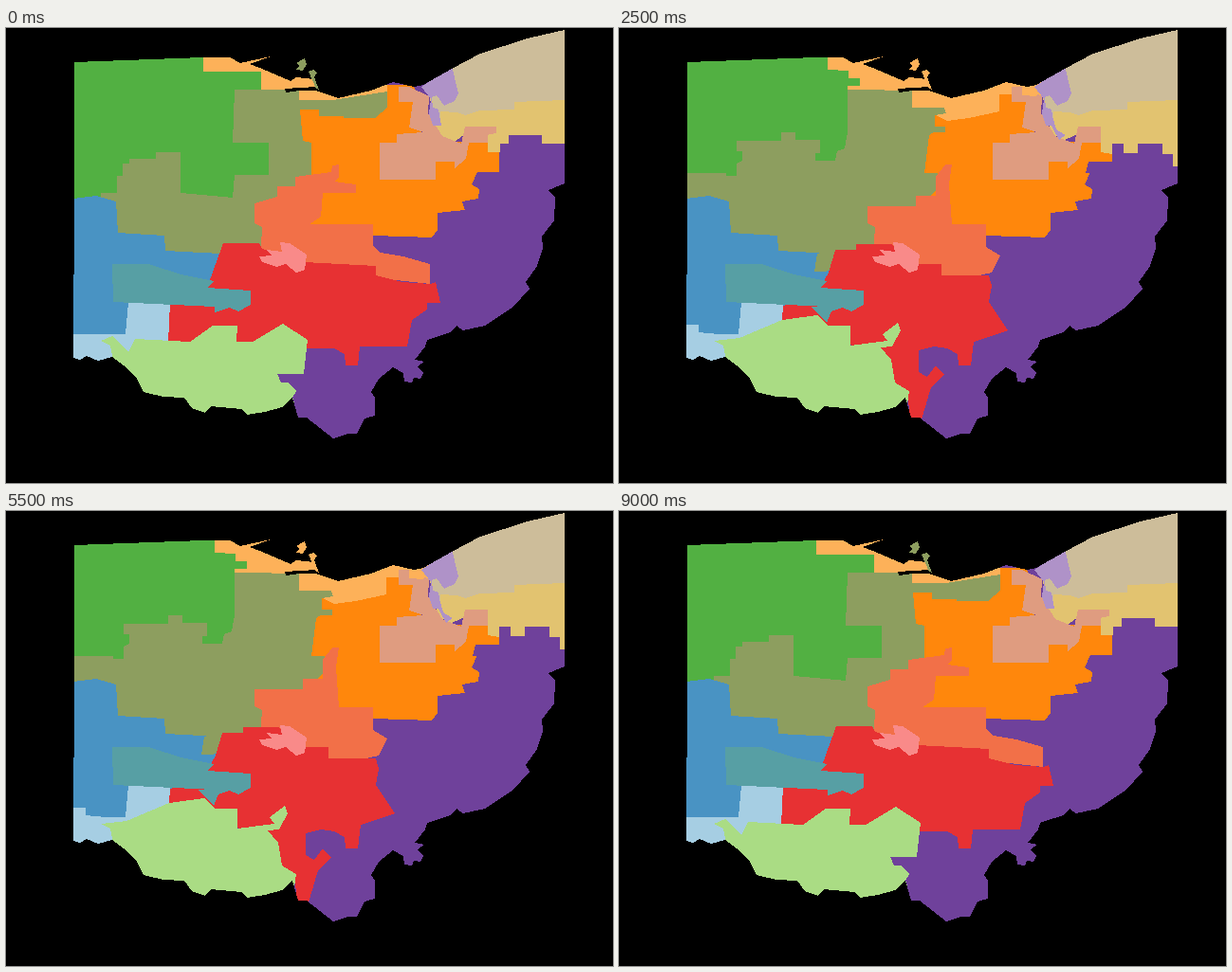
An HTML page for the animation above (10000 ms loop, 640 px wide and 480 px high).

```html
<!DOCTYPE html>
<html lang="en">
<head>
<meta charset="utf-8">
<title>District map</title>
<style>
  html, body { margin: 0; height: 100%; overflow: hidden; background: #000; }
  svg { display: block; width: 100%; height: 100%; }
  svg.later .before, svg:not(.later) .after { display: none; }
  .lightblue { fill: #a6cee3 } .blue { fill: #4993c3 }
  .teal { fill: #579fa4 } .lime { fill: #aadc84 }
  .green { fill: #52b042 } .olive { fill: #8d9e5f }
  .pink { fill: #f98a89 } .red { fill: #e73133 }
  .coral { fill: #f27048 } .peach, .later .isles { fill: #fdb159 }
  .orange { fill: #ff870c } .salmon { fill: #df9c80 }
  .lilac { fill: #af92c8 } .purple { fill: #6f419b }
  .tan { fill: #cdbd9a } .yellow { fill: #e2c370 }
</style>
</head>
<body>
<!-- each layer covers the rough edges of those beneath it -->
<svg viewBox="0 0 640 480" shape-rendering="crispEdges">
  <path class="purple" d="M71,0H589V435H71z"/>
  <path class="orange" d="M310,60H430L440,120H520V152H497L491,165 499,170 498,180 481,183 484,192 455,195V213L449,221 387,219 310,205z"/>
  <path class="after purple" d="M521,141H495L492,153H521z"/>
  <path class="before yellow" d="M446,70H589V122H565V113H530V122H521V131H508V112H484L470,122 456,118z"/>
  <path class="after yellow" d="M446,70H589V146H584V133H573V122H547V132H532V122H520V133L508,131V112H484L470,118 456,112z"/>

  <path class="before peach" d="M208,25H402V80H208z"/>
  <path class="after peach" d="M220,25H448V72L414,70H401V88L369,95 346,98 330,90H220z"/>
  <path class="before olive" d="M72,60H250V65H309V76H345L402,67V84L389,95H356V93H330V86H310L313,119 322,121V156L265,240H72z"/>
  <path class="after olive" d="M72,62L309,66V84H343L345,90 333,92V104H344V110H332L327,113 322,153H336V170L265,240H72z"/>
  <path class="before green" d="M72,30H208V46H269V65H241L239,121H277V155H241L239,179 184,174V131H158V138H130V143H123V156H117V174H100V181H72z"/>
  <path class="after green" d="M72,30H220V44L242,45V53H254V61H241V110L238,127 230,130 228,140H207V132H212V118H186V110H171V119H124V130H130V140L124,143V156H113V153H72z"/>
  <path class="before coral" d="M270,210L262,206V185L286,178V167H305V157L343,152 344,145 351,144V157L346,162 369,165V174H334L332,199 320,207H387V230L395,237 419,241 447,249V270L268,250z"/>
  <path class="after coral" d="M270,210L262,206V188H313V177H334V157L344,144H351L348,165 351,207H387V231L402,240 393,258 341,270 268,240z"/>
  <path class="blue" d="M71,180L95,177 116,183 118,216 167,219 168,235 227,238 240,290 127,323H71z"/>
  <path class="after olive" d="M209,238L250,228V240L218,257H206z"/>
  <path class="before red" d="M229,227H267L270,233 315,247 390,251V261L418,268 447,270 453,268 458,290H444V297L428,308 423,336H373L371,356H358L357,344 346,338H240L170,330 173,292 258,285 212,274z"/>
  <path class="after red" d="M250,228H287L315,249H340V261H390L393,272 390,289 410,319 374,331 371,356H358L357,344 346,338 332,336 316,340V363L325,368 334,356 343,366 329,379 319,413H307L305,393 240,330 244,314H172V293L258,277 212,274 221,258 228,234H250z"/>
  <path class="lightblue" d="M129,290H173L171,331 125,352H71V323H126z"/>
  <path class="after lightblue" d="M71,313H84V321L127,325H71z"/>
  <path class="after teal" d="M202,294H226L219,311z"/>
  <path class="teal" d="M112,249H150L185,260 219,267 212,274 258,277V292L245,299 236,295 220,300V294L113,289z"/>
  <path class="before lime" d="M100,330L112,325 129,342 136,328 194,331 218,314H244L243,331H260L292,312 318,329 314,365H288L306,383 302,410H120L112,346 110,335z"/>
  <path class="before purple" d="M286,365H314V400H306L302,390 306,383 298,374H290z"/>
  <path class="after lime" d="M100,330L127,327 172,308 209,303 220,314H244V335L283,330 278,323 294,311 297,319 288,336 276,337 287,350 291,374 306,383 302,410H120L112,346 110,335z"/>

  <path class="salmon" d="M414,62H425L446,72 445,90 460,114 480,122 484,104H508V121H488L485,138 473,148V141H453V160H394V121H412V112L440,110 425,105 429,78H414z"/>
  <path class="before salmon" d="M507,104H517V111L507,113z"/>
  <path class="after peach" d="M425,62H446L440,72 425,71z"/>
  <path class="tan" d="M449,72L470,35 500,0H589V76L536,78V86L500,87 484,92 475,89 458,88V103L451,92z"/>
  <path class="lilac" d="M438,62L470,40 477,69 473,77 462,82 454,71 449,73 450,84 456,86 459,103H450L446,90 448,75z"/>
  <path class="after lilac" d="M452,96H458L461,107 471,113 464,118z"/>
  <path class="pink" d="M267,241L280,240 275,234 291,236 289,226 299,227 317,239 315,255 306,258 295,249 285,252 270,247z"/>

  <!-- surroundings -->
  <path d="M0,0H640V2H589L550,11 500,27 470,43 440,60 430,62 408,57 385,66 350,74 327,66H309L295,68 294,64 327,62 325,54 306,52 300,56 270,43 257,38 279,30 247,37 236,31H208L72,36V180L71,348H0z"/>
  <path d="M640,0V480H345V433L360,428H370L378,412 389,409V390L385,384 393,370 408,358 419,364 420,373 428,374 430,369 437,370 440,364 434,357 441,352 431,350 442,336 444,329 468,321 475,314 482,319 505,314 535,294 552,275 548,268 560,251 566,232 565,220 578,203 579,179 572,171 589,164V0z"/>
  <path d="M0,480V348H71L78,350 85,346 97,351 112,347 128,359 138,370 145,384 166,389 188,390 196,401 210,406 216,399 248,402 254,408 273,405 291,400 302,390 308,411H317L345,433V480z"/>
  <path class="olive isles" d="M306,37L315,32 317,38 313,45 306,44 309,40zM319,46L324,44 328,47 325,52 330,65 327,64z"/>
</svg>
<script>
  const map = document.querySelector("svg");
  function draw() {
    const time = performance.now() % 10000;
    map.classList.toggle("later", time >= 2500 && time < 7500);
    requestAnimationFrame(draw);
  }
  draw();
</script>
</body>
</html>
```
